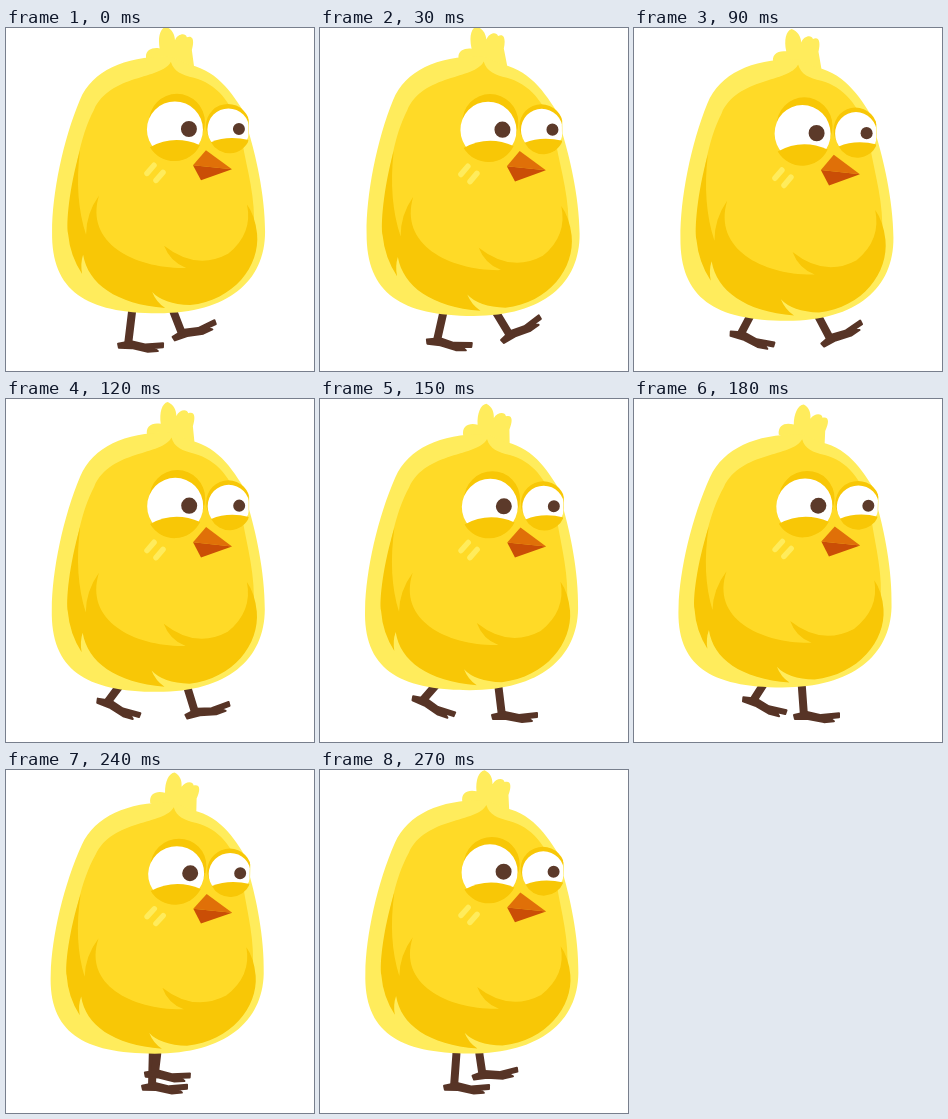
An HTML page for the animation above (300 ms loop, 308 by 343 pixels).

```html
<!DOCTYPE html>
<html lang="en">
<head>
<meta charset="utf-8">
<title>Walking chick</title>
<style>
  html, body { margin: 0; width: 100%; height: 100%; overflow: hidden; background: #fff; }
  svg { display: block; }
  .pale { fill: #ffec5c; }
  .mid { fill: #ffda27; }
  .shade { fill: #f8c706; }
  .white { fill: #fff; }
  .pupil { fill: #5c3a2a; }
  .limb { fill: #573426; stroke: #573426; stroke-width: 2; stroke-linejoin: round; }
  .leg { fill: none; stroke-width: 8; }
  .cheek { stroke: #ffec5c; stroke-width: 5.5; stroke-linecap: round; }
</style>
</head>
<body>
<svg width="308" height="343" viewBox="0 0 308 343">
  <defs>
    <clipPath id="face"><path d="M0 0H242.5V343H0z"/></clipPath>
    <path id="foot" d="M-10 -1L3 -4L17 -1L35 -3V1L26 2L30 5L20 6L4 3L-9 3z"/>
  </defs>

  <g class="limb"><path class="leg"/><use href="#foot"/></g>
  <g class="limb"><path class="leg"/><use href="#foot"/></g>

  <g id="body">
    <path id="tuft" class="pale" d="M141 31C139 21 147 18 155 20C154 9 157 0 163 -1C169 2 171 7 171 13C174 7 182 6 183 11C190 9 190 16 187 24L188 42Q165 45 141 31z"/>
    <path class="pale" d="M165 29C121 28 87 42 74 72C57 112 46 165 46 203C45 262 80 284 152 284C222 284 259 252 259 203C259 165 249 125 243 105V92C228 68 214 44 184 37z"/>
    <path class="mid" d="M165 34C168 44 176 47 188 50C210 56 226 73 235 105C238 130 248 160 248 190C248 235 212 256 155 256C110 256 72 235 66 190C66 150 74 108 88 82C104 46 156 52 165 34z"/>
    <path class="shade" d="M74 122C63 160 60 195 62 205Q64 227 76 245Q74 235 77 226C82 255 110 275 159 279Q150 273 146 263Q157 275 184 276C228 271 254 237 251 205Q249 187 241 176Q247 205 222 225Q190 242 158 217Q164 233 180 239C130 240 78 215 93 167Q80 185 80 206Q68 170 74 122z"/>
    <path class="cheek" d="M141 145L148 137M150 152L157 144"/>
    <g clip-path="url(#face)">
      <circle class="shade" cx="171" cy="94" r="28"/>
      <circle class="white" cx="169" cy="101.5" r="28"/>
      <path class="shade" d="M144 119Q168 106 194 117A28.5 28.5 0 0 1 144 119z"/>
      <circle class="pupil" cx="183" cy="101" r="8"/>
      <circle class="shade" cx="222" cy="98" r="22"/>
      <circle class="white" cx="222.5" cy="101.5" r="21"/>
      <path class="shade" d="M205 114Q222 107 243 112A21 21 0 0 1 205 114z"/>
      <circle class="pupil" cx="233" cy="101" r="6"/>
    </g>
    <path fill="#e07008" d="M187 137L200 122L226 141z"/>
    <path fill="#ca4e06" d="M187 137L226 141L195 152z"/>
  </g>
</svg>
<script>
const STEP = 30, STEPS = 10, STRIDE = 2 * STEPS;

// Key poses of one stride, which lasts two loops; the legs are half a stride apart
const poses = [
  { at: 2, hip: 184, x: 204, y: 309, angle: -42 },
  { at: 5, hip: 178, x: 182, y: 317, angle: 0 },
  { at: 10, hip: 126, x: 122, y: 317, angle: 2 },
  { at: 14.7, hip: 114, x: 97, y: 302, angle: 25 },
  { at: 17, hip: 143, x: 135, y: 303, angle: 15 }
];
poses.push({ ...poses[0], at: poses[0].at + STRIDE });

const body = document.getElementById('body');
const tuft = document.getElementById('tuft');
const limbs = [...document.querySelectorAll('.limb')];

// Swings once per loop around a mean, highest at the given share of the loop
const swing = (step, mean, size, peak) =>
  mean + size * Math.cos(2 * Math.PI * (step / STEPS - peak));

function drawLimb(limb, step) {
  const phase = step < poses[0].at ? step + STRIDE : step;
  const next = poses.findIndex(pose => pose.at > phase);
  const a = poses[next - 1], b = poses[next];
  const mix = key => a[key] + (b[key] - a[key]) * (phase - a.at) / (b.at - a.at);
  const x = mix('x'), y = mix('y');
  limb.children[0].setAttribute('d', `M${mix('hip')} 274v10L${x} ${y}`);
  limb.children[1].setAttribute('transform', `translate(${x} ${y}) rotate(${mix('angle')})`);
}

function draw(step) {
  const headDy = swing(step, 2.8, 3.5, .57);
  const baseDy = swing(step, 4.2, 4.8, .36);
  const lean = swing(step, .4, 1.1, .68);
  const stretch = (baseDy - headDy) / 253;
  body.setAttribute('transform',
    `matrix(1 0 ${-lean / 50} ${1 + stretch} ${3 * lean} ${headDy - 30 * stretch})`);
  tuft.setAttribute('transform', `rotate(${6 * lean - 4} 165 36)`);
  limbs.forEach((limb, i) => drawLimb(limb, step + i * STEPS));
}

function tick() {
  draw(Math.floor(performance.now() / STEP) % STEPS);
  requestAnimationFrame(tick);
}
tick();
</script>
</body>
</html>
```
